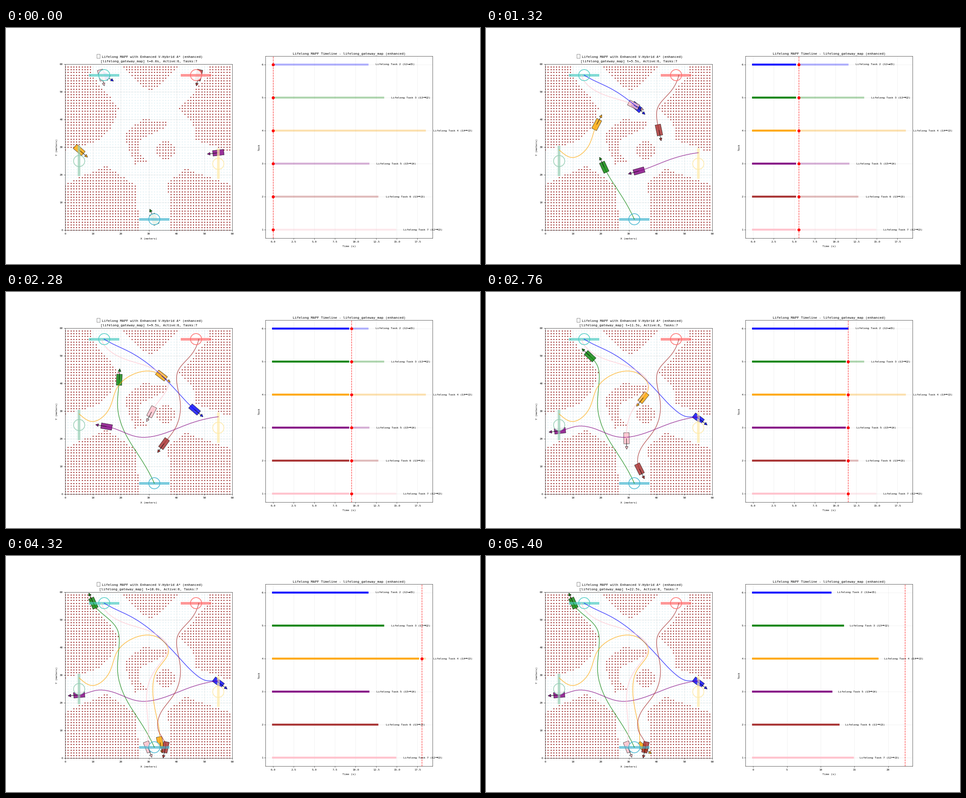
Write a matplotlib script that moves like this. It is 1058 px wide and 529 px high and loops after 5.52 s.

```python
import numpy as np
import matplotlib.pyplot as plt
from matplotlib.animation import FuncAnimation
from matplotlib.patches import Circle, Polygon, Rectangle
from matplotlib.path import Path

W, H, DPI = 1058, 529, 52.9
FRAMES, STEP_MS, DT = 46, 120, 0.5
SMALL, BIG = 8.35, 10.07
RAMP = 1.86  # seconds a car needs to reach cruising speed

plt.rcParams.update({"font.family": "DejaVu Sans Mono", "font.size": SMALL})

# Corners of the blocked areas, in metres
BLOCKS = [
    [(-1, 16.4), (14.5, 23.4), (25.8, 16), (26.2, -1), (-1, -1)],
    [(60, 16.4), (42.9, 22.4), (36.8, 17.2), (37.7, -1), (60, -1)],
    [(-1, 60), (9.4, 60), (9.4, 56), (19.3, 44), (16, 36), (11, 32.2), (-1, 28.5)],
    [(60, 60), (51.6, 60), (51.6, 56), (40.7, 44.2), (46, 38), (46.8, 32.8), (60, 27.7)],
    [(19.6, 60), (30.5, 49.6), (41.4, 60)],
    [(27.6, 40.3), (21.8, 35.5), (21.8, 32), (25, 23.8), (29.3, 25), (26.1, 28),
     (26.1, 32), (36.3, 37.5), (36.2, 39.5)],
]
ISLAND, ISLAND_R = 36 + 29j, 3.3

# Gate: centre, half bar, colour
GATES = [
    (47 + 56j, 5, "#FF6B6B"),
    (14 + 56j, 5, "#4ECDC4"),
    (32 + 4j, 5, "#45B7D1"),
    (5 + 25j, 5j, "#96CEB4"),
    (55 + 24j, 5j, "#FFEAA7"),
]

# Task: number, from, to, colour, arrival time, first and last heading, route
TASKS = [
    (2, 2, 5, "blue", 11.43, -33, -37,
     [14+56j, 23.1+51.4j, 40.2+37.1j, 47.3+29.9j, 51+28j, 55+27.4j]),
    (3, 3, 2, "green", 13.33, 114, 114,
     [32+4j, 27.3+12.6j, 21.4+22.3j, 18.8+31.6j, 19.4+41.5j, 18.9+46j,
      13.8+51.8j, 10.1+56j]),
    (4, 4, 3, "orange", 18.42, -41, -38,
     [5+29j, 9.3+26.3j, 15.4+30.2j, 18.6+38.4j, 24.4+43.3j, 33.9+43.3j,
      37.1+38.9j, 33.1+32j, 31.5+26.3j, 33+14.2j, 33.9+8.5j, 35+4.1j]),
    (5, 5, 4, "purple", 11.56, 187, 185,
     [55+28j, 44.4+25.4j, 35+21.8j, 26.2+20.7j, 18+23.6j, 11+24.5j, 5+22.9j]),
    (6, 1, 3, "brown", 12.67, -103, -102,
     [48+56j, 45.4+50.5j, 40.4+44.2j, 41.3+33.5j, 39.1+23.1j, 33.8+15.3j,
      33.7+9.5j, 36+4j]),
    (7, 2, 3, "pink", 14.8, -75, -69,
     [13+56j, 22.2+48.5j, 31.8+45.2j, 37+40j, 34.2+34.4j, 30.5+28.6j,
      29.2+20j, 29.7+7.6j, 29.7+4.1j]),
]

# Car shapes in the complex plane, pointing along +x
BODY = np.array([-2 - 1j, 2 - 1j, 2 + 1j, -2 + 1j])
HEAD = np.array([3 - 0.5j, 4, 3 + 0.5j])


def heading(degrees):
    return np.exp(1j * np.radians(degrees))


def spline(points, first, last, steps=40):
    """Clamped cubic spline through the points: positions and directions."""
    p = np.array(points)
    d = np.diff(p)
    h = np.abs(d)
    system, rhs = np.eye(len(p)), np.zeros(len(p), complex)
    rhs[0], rhs[-1] = heading(first), heading(last)
    for i in range(1, len(p) - 1):
        a, b = 1 / h[i - 1], 1 / h[i]
        system[i, i - 1:i + 2] = a, 2 * (a + b), b
        rhs[i] = 3 * (d[i - 1] * a * a + d[i] * b * b)
    m = np.linalg.solve(system, rhs)

    s = np.linspace(0, 1, steps)[:, None]
    v0, v1 = m[:-1] * h, m[1:] * h
    a, b = v0 + v1 - 2 * d, 3 * d - 2 * v0 - v1
    pos = ((a * s + b) * s + v0) * s + p[:-1]
    vel = (3 * a * s + 2 * b) * s + v0
    return pos.T.ravel(), (vel / np.abs(vel)).T.ravel()


def ramp(t):
    """Distance at unit cruising speed after speeding up from rest."""
    return np.where(t < RAMP, t * t / (2 * RAMP), t - RAMP / 2)


class Track:
    def __init__(self, points, first, last, end):
        self.pos, self.dir = spline(points, first, last)
        run = np.append(0, np.cumsum(np.abs(np.diff(self.pos))))
        self.run, self.end = run / run[-1], end

    def at(self, t):
        done = ramp(np.clip(t, 0, self.end)) / ramp(self.end)
        return np.interp(done, self.run, self.pos), np.interp(done, self.run, self.dir)


def xy(z):
    return np.column_stack([z.real, z.imag])


fig, (world, chart) = plt.subplots(1, 2, figsize=(W / DPI, H / DPI), dpi=DPI)


def label(x, y, text, size=SMALL, **kw):
    return fig.text(x / W, 1 - y / H, text, fontsize=size, ha="center", **kw)


def draw_world():
    world.set(xlim=(0, 60), ylim=(0, 60), aspect="equal")
    world.grid(ls="--", alpha=0.5)
    gx, gy = np.meshgrid(np.arange(60), np.arange(60))
    cells = (gx + 1j * gy).ravel()
    blocked = np.abs(cells - ISLAND) < ISLAND_R
    for corners in BLOCKS:
        blocked |= Path(corners).contains_points(xy(cells))
    for group, size, color, alpha in [(cells[~blocked], 12, "lightblue", 0.33),
                                      (cells[blocked], 11, "darkred", 0.95)]:
        world.scatter(group.real, group.imag, s=size, c=color, alpha=alpha, lw=0, zorder=0.5)
    for centre, half, color in GATES:
        spot = (centre.real, centre.imag)
        bar = np.array([centre - half, centre + half])
        world.add_patch(Circle(spot, 2, fc="white", ec="none", alpha=0.9, zorder=3))
        world.plot(bar.real, bar.imag, color=color, lw=8, alpha=0.7, zorder=3.1)
        world.add_patch(Circle(spot, 2, fill=False, ec=color, lw=2, zorder=3.3))


def draw_text():
    fig.add_artist(Rectangle((203.2 / W, 1 - 67.5 / H), 6.6 / W, 8 / H,
                             fill=False, ec="black", lw=0.6))
    label(326, 66.4, "Lifelong MAPF with Enhanced V-Hybrid A* (enhanced)", BIG)
    label(765.9, 59.2, "Lifelong MAPF Timeline - lifelong_gateway_map (enhanced)", BIG)
    label(318.6, 473.6, "X (meters)")
    label(765.9, 490.8, "Time (s)")
    label(114, 267.2, "Y (meters)", va="center", rotation=90)
    label(565, 267.2, "Task", va="center", rotation=90)


def task_label(x, y, num, a, b):
    pieces = [(f"Lifelong Task {num} (G{a}", 0, {}),
              ("→", 95.5, dict(family="DejaVu Sans", weight="bold", size=10)),
              (f"G{b})", 105, {})]
    for text, dx, style in pieces:
        chart.annotate(text, (x, y), xytext=(dx, 0), textcoords="offset points",
                       va="center", annotation_clip=False, **style)


class Task:
    def __init__(self, row, num, a, b, color, end, first, last, points):
        self.track = Track(points, first, last, end)
        self.row, self.end = row, end
        z = 2 - row * 0.1
        car = dict(fc=color, ec="black", lw=1, closed=True)
        self.body = world.add_patch(Polygon(xy(BODY), alpha=0.8, zorder=z, **car))
        self.shaft, = world.plot([], [], color="black", lw=1.2, zorder=z + 0.02)
        self.head = world.add_patch(Polygon(xy(HEAD), alpha=0.9, zorder=z + 0.04, **car))
        self.trail, = world.plot([], [], color=color, lw=2, alpha=0.7, zorder=3.2)
        self.rest, = chart.plot([], [], color=color, lw=6, alpha=0.3, zorder=2)
        self.done, = chart.plot([], [], color=color, lw=6, alpha=0.95, zorder=2.1)
        self.dot, = chart.plot([], [], "o", color="red", ms=8, zorder=4)
        task_label(end + 1, row, num, a, b)

    def update(self, t):
        pos, turn = self.track.at(t)
        self.body.set_xy(xy(pos + BODY * turn))
        self.head.set_xy(xy(pos + HEAD * turn))
        tip = pos + 3 * turn
        self.shaft.set_data([pos.real, tip.real], [pos.imag, tip.imag])
        now, active = min(t, self.end), t < self.end
        route, _ = self.track.at(np.linspace(0, now, 160))
        self.trail.set_data(route.real, route.imag)

        level = [self.row] * 2
        self.done.set_data([0, max(t - 0.4, 0) if active else self.end], level)
        self.done.set_visible(t > 0)
        self.rest.set_data([now, self.end], level)
        self.rest.set_visible(active)
        self.dot.set_data([t], [self.row])
        self.dot.set_visible(active)


draw_world()
draw_text()
for ax in (world, chart):
    ax.tick_params(axis="x", pad=4.3)
chart.set_ylim(0.75, 6.25)
chart.grid(alpha=0.3)
tasks = [Task(len(TASKS) - i, *spec) for i, spec in enumerate(TASKS)]
latest = max(task.end for task in tasks)
clock = chart.axvline(0, color="red", ls="--", lw=1.5, alpha=0.8, zorder=3)
status = label(318.6, 76.4, "", BIG)


def update(frame):
    t = frame * DT
    for task in tasks:
        task.update(t)
    clock.set_xdata([t, t])
    span = max(t, latest)
    chart.set_xlim(-0.05 * span, 1.05 * span)
    status.set_text(f"[lifelong_gateway_map] t={t:.1f}s, Active:6, Tasks:7")
    return []


anim = FuncAnimation(fig, update, frames=FRAMES, interval=STEP_MS, repeat=True, blit=False)
plt.show()
```
